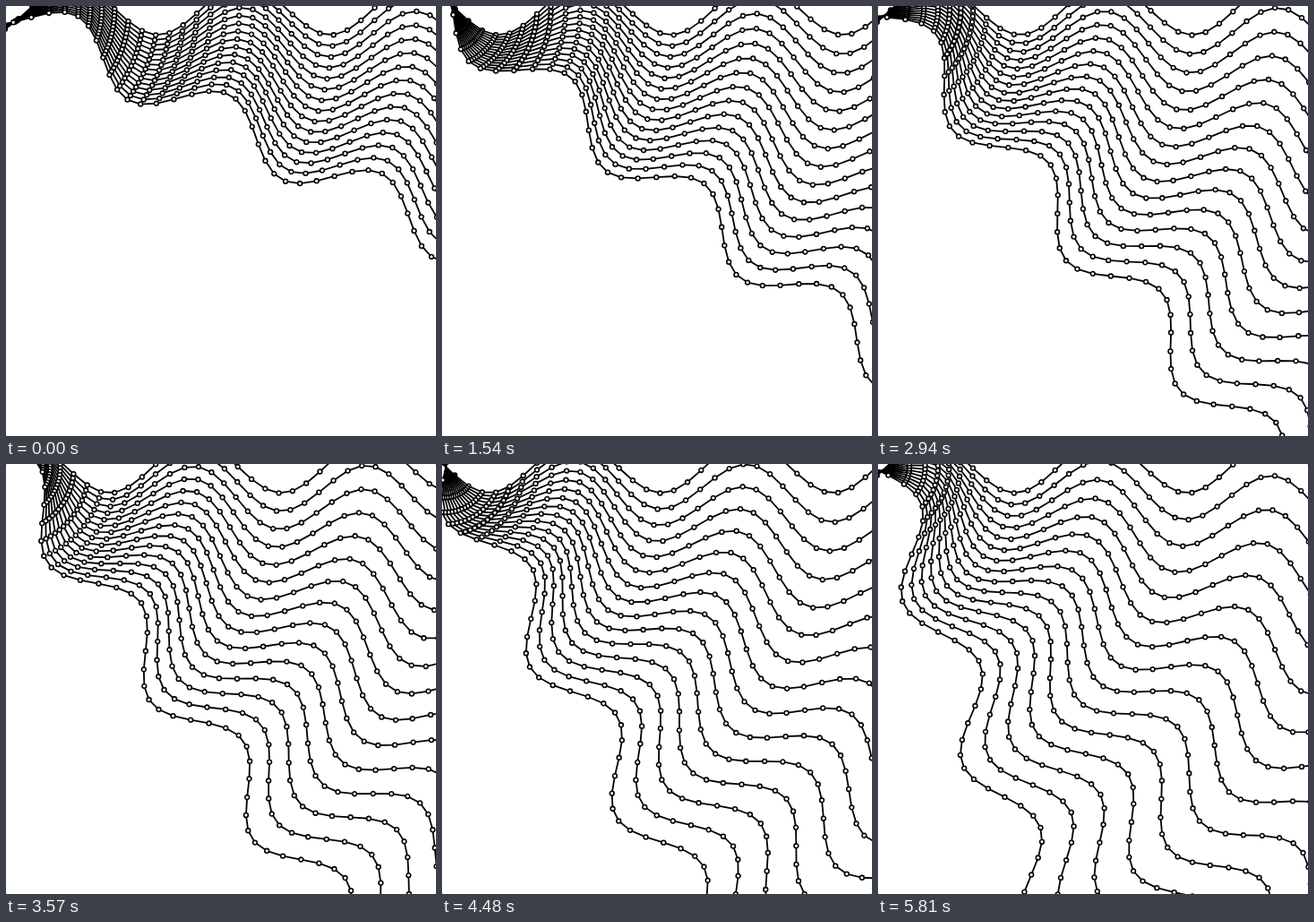
Recreate the animation shown at these times as an HTML page. Size 480x480 px, loop 5.88 s.

```html
<!DOCTYPE html>
<html lang="en">
<head>
<meta charset="utf-8">
<title>Wave fan</title>
<style>
  html, body { margin: 0; width: 100%; height: 100%; overflow: hidden; background: #bbb; }
  svg { display: block; width: 100vw; height: 100vh; }
  path { stroke: #000; stroke-linejoin: round; }
  .thread { fill: none; stroke-width: 1.8; }
  .beads { fill: #fff; stroke-width: 1.6; }
</style>
</head>
<body>
<svg viewBox="0 0 480 480"><rect width="480" height="480" rx="2" fill="#fff"/></svg>
<script>
const STEP_MS = 70, STEPS = 84;
const CHAINS = 15, NODES = 52;
const SPACING = 15.28, LEAD = -4, AMPLITUDE = 28.8, RADIUS = 2.4;
const PIVOT = { x: 3, y: 3.7 };
const START_PHASE = 8.55, PHASE_STEP = 0.158;
const START_FAN = 0.0341, FAN_STEP = 0.000638;

const svg = document.querySelector("svg");

function addPath(className) {
  const path = document.createElementNS("http://www.w3.org/2000/svg", "path");
  path.setAttribute("class", className);
  return svg.appendChild(path);
}

const chains = Array.from({ length: CHAINS }, () => ({
  thread: addPath("thread"),
  beads: addPath("beads")
}));

// A sine wave along a ray turned about the pivot
function chainPoints(angle, phase) {
  const c = Math.cos(angle), s = Math.sin(angle);
  return Array.from({ length: NODES }, (_, n) => {
    const along = LEAD + n * SPACING;
    const across = AMPLITUDE * Math.sin(n / 2 + phase);
    return [PIVOT.x + along * c - across * s, PIVOT.y + along * s + across * c];
  });
}

function bead([x, y]) {
  const d = 2 * RADIUS;
  return `M${(x - RADIUS).toFixed(2)} ${y.toFixed(2)}` +
    `a${RADIUS} ${RADIUS} 0 1 0 ${d} 0a${RADIUS} ${RADIUS} 0 1 0 ${-d} 0z`;
}

function draw(step) {
  const phase = START_PHASE + step * PHASE_STEP;
  const fan = START_FAN + step * FAN_STEP;
  chains.forEach(({ thread, beads }, j) => {
    const points = chainPoints(j * fan, phase);
    thread.setAttribute("d", "M" + points.map(p => p.map(v => v.toFixed(2)).join(" ")).join("L"));
    beads.setAttribute("d", points.map(bead).join(""));
  });
}

const start = performance.now();
let shown = 0;

function tick() {
  const step = Math.floor((performance.now() - start) / STEP_MS) % STEPS;
  if (step !== shown) draw(shown = step);
  requestAnimationFrame(tick);
}

draw(0);
requestAnimationFrame(tick);
</script>
</body>
</html>
```
